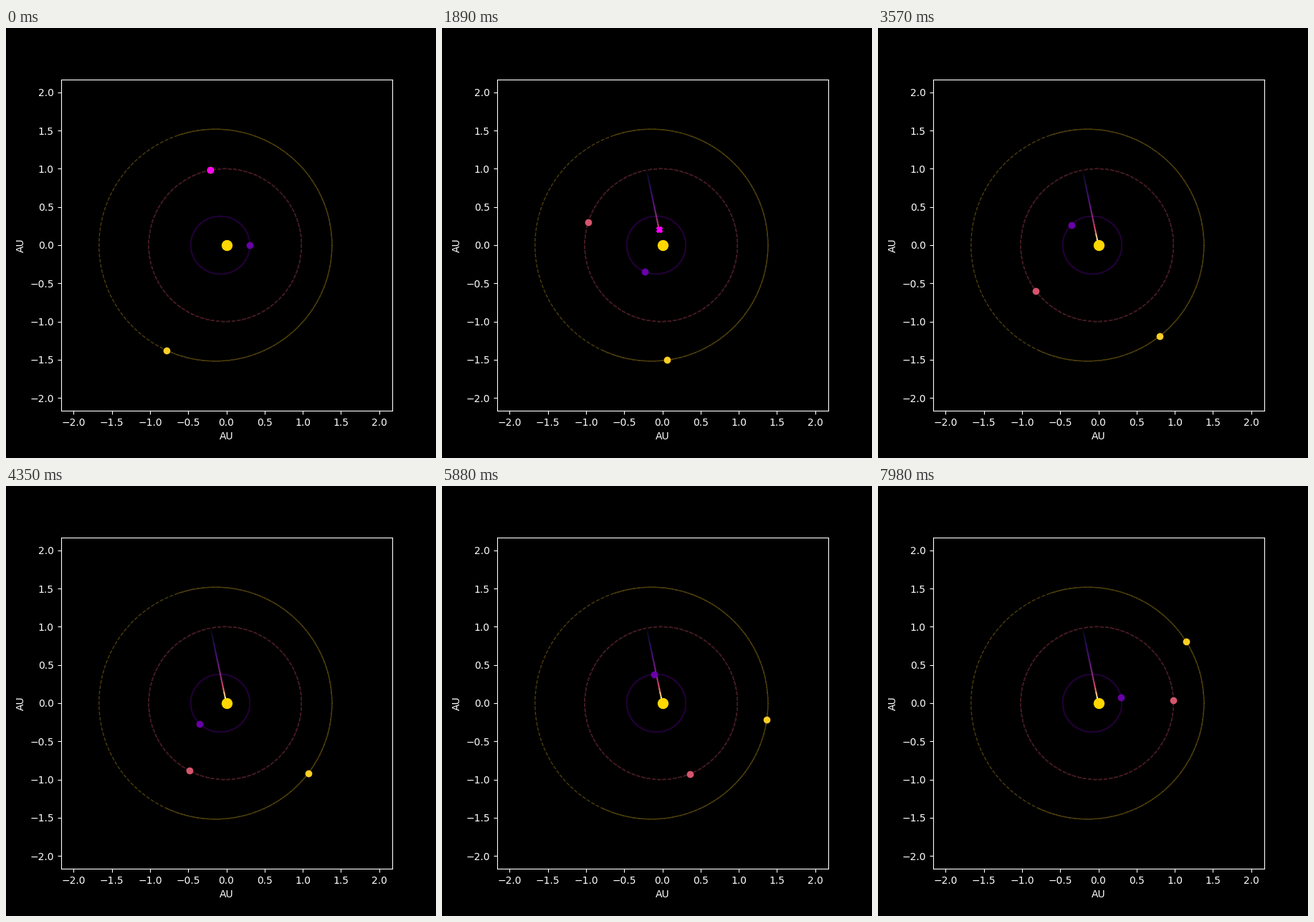
These frames come from a looping animation (600x600 px, 8 s). A matplotlib script:

```python
import numpy as np
import matplotlib.pyplot as plt
from matplotlib.animation import FuncAnimation
from matplotlib.collections import LineCollection

LOOP_MS = 8000
FRAMES = 267
YEAR = 365.25
ORBIT_DAYS = 3 * YEAR
FALL_RATE = 0.986      # days of free fall per frame

# semi-major axis (AU), eccentricity, mean anomaly at day 0 (degrees)
PLANETS = [(0.387, 0.2056, 0), (1.0, 0.0167, 100), (1.524, 0.0934, 250)]


def position(planet, day):
    """Kepler orbit with perihelion on the +x axis."""
    a, e, m0 = planet
    m = np.radians(m0) + 2 * np.pi * np.asarray(day) / (YEAR * a ** 1.5)
    ecc = m + e * np.sin(m)
    for _ in range(8):
        ecc = ecc - (ecc - e * np.sin(ecc) - m) / (1 - e * np.cos(ecc))
    return a * (np.cos(ecc) - e), a * np.sqrt(1 - e * e) * np.sin(ecc)


def fall_radius(day, r0):
    """Distance from the Sun after a free fall from rest at r0."""
    beta = np.linspace(0, np.pi / 2, 4000)
    t = r0 ** 1.5 * YEAR / (2 * np.pi * np.sqrt(2))
    t = t * (beta + np.sin(beta) * np.cos(beta))
    return np.interp(day, t, r0 * np.cos(beta) ** 2, right=0)


days = np.arange(FRAMES)
tracks = [position(p, days) for p in PLANETS]

# probe falling from the second planet's starting point
start = np.array([tracks[1][0][0], tracks[1][1][0]])
r0 = np.hypot(*start)
radius = fall_radius(days * FALL_RATE, r0)
impact = int(np.argmax(radius == 0))
probe = radius[:impact + 1, None] * start / r0

speed = np.sqrt(1 / radius[:impact] - 1 / r0)
speed = np.append(speed, speed[-1])
tint = (speed[:-1] + speed[1:]) / 2 / speed[-1]
segments = np.stack([probe[:-1], probe[1:]], axis=1)
seg_colors = plt.get_cmap("magma")(tint)

plt.style.use("dark_background")
fig, ax = plt.subplots(figsize=(6, 6), dpi=100)
limit = 1.3 * 1.524 * 1.0934
ax.set_aspect("equal")
ax.set_xlim(-limit, limit)
ax.set_ylim(-limit, limit)
ax.set_xlabel("AU")
ax.set_ylabel("AU")

colors = plt.get_cmap("plasma")(np.linspace(0.2, 0.9, 3))
orbit_days = np.arange(ORBIT_DAYS)
dots = []
for planet, color in zip(PLANETS, colors):
    ax.plot(*position(planet, orbit_days), "--", color=color, lw=1, alpha=0.3)
    dots += ax.plot([], [], "o", color=color, ms=6, zorder=4)

trail = LineCollection([], linewidths=1.5, zorder=3)
ax.add_collection(trail, autolim=False)
ship, = ax.plot([], [], "X", color="magenta", ms=6, zorder=5)
ax.plot(0, 0, "o", color="gold", ms=10, zorder=6)


def update(day):
    for dot, (x, y) in zip(dots, tracks):
        dot.set_data([x[day]], [y[day]])
    n = min(day, impact)
    trail.set_segments(segments[:n])
    trail.set_color(seg_colors[:n])
    ship.set_data([probe[n, 0]], [probe[n, 1]])
    return [*dots, trail, ship]


anim = FuncAnimation(fig, update, frames=FRAMES, interval=LOOP_MS / FRAMES,
                     init_func=lambda: update(0), repeat=True, repeat_delay=0)
plt.show()
```
